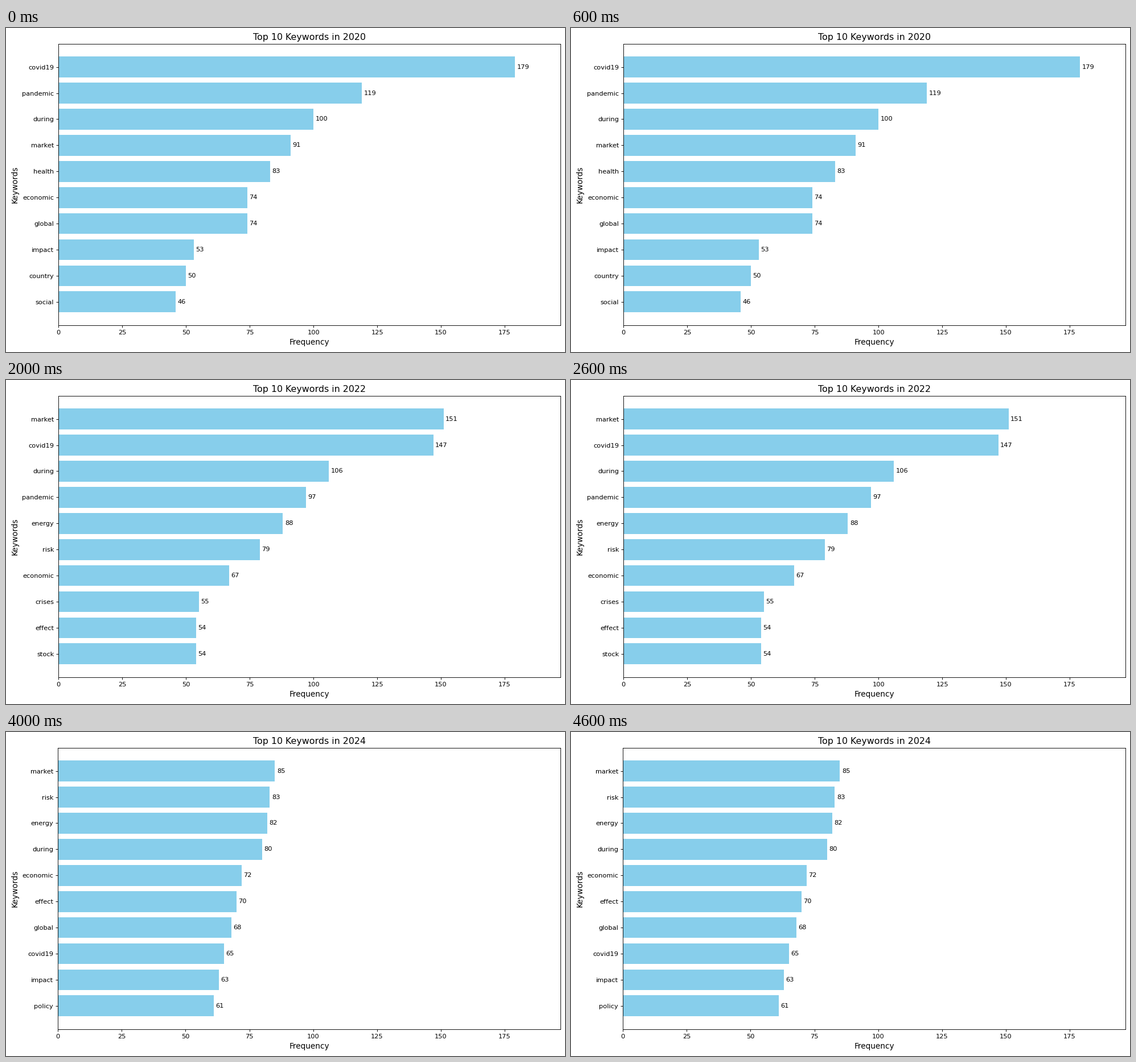
Write a matplotlib script that moves like this. It is 982 px wide and 570 px high and loops after 5 s.

```python
import matplotlib.pyplot as plt
import numpy as np
from matplotlib.animation import FuncAnimation

W, H, DPI = 982, 570, 64
K = 81.8 / DPI  # chart scale relative to the figure dpi

plt.rcParams["font.family"] = "DejaVu Sans"
plt.rcParams["axes.labelsize"] = "large"
plt.rcParams["axes.labelpad"] = 5
scaled = ["font.size", "axes.titlepad", "axes.labelpad", "axes.linewidth"]
scaled += [f"{a}tick.major.{part}" for a in "xy" for part in ("size", "width", "pad")]
for key in scaled:
    plt.rcParams[key] *= K

FIRST_YEAR = 2020
# keywords by rank, and the key points {rank: count} of each ranking curve
RANKINGS = [
    ("covid19 pandemic during market health economic global impact country social",
     {0: 179, 1: 119, 2: 100, 5: 74, 6: 74, 7: 53, 9: 46}),
    ("covid19 pandemic market during impact economic global country stock health",
     {0: 175, 2: 103, 4: 91, 5: 66, 9: 59}),
    ("market covid19 during pandemic energy risk economic crises effect stock",
     {0: 151, 1: 147, 2: 106, 5: 79, 7: 55, 9: 54}),
    ("market covid19 energy risk during stock economic impact green esg",
     {0: 174, 1: 105, 5: 87, 9: 76}),
    ("market risk energy during economic effect global covid19 impact policy",
     {0: 85, 3: 80, 4: 72, 9: 61}),
]
X_MAX = 1.1 * max(points[0] for _, points in RANKINGS)
RIGHT, BOTTOM, TOP = 974.2, 47.3, 542.2  # axes edges, y measured upwards

fig = plt.figure(figsize=(W / DPI, H / DPI), dpi=DPI, facecolor="white")
ax = fig.add_axes([0, 0, 1, 1])


def draw(i):
    text, points = RANKINGS[i]
    words = text.split()
    counts = np.round(np.interp(range(len(words)), list(points), list(points.values())))
    # the longest keyword pushes the axes one pixel to the right
    left = 92.2 if "pandemic" in words else 91.2

    ax.clear()
    ax.set_position([left / W, BOTTOM / H, (RIGHT - left) / W, (TOP - BOTTOM) / H])
    bars = ax.barh(words, counts, color="skyblue")
    ax.bar_label(bars, padding=3 * K)
    ax.set_xlim(0, X_MAX)
    ax.set_xticks(range(0, 176, 25))
    ax.invert_yaxis()
    ax.set_title(f"Top {len(words)} Keywords in {FIRST_YEAR + i}", fontsize=14 * K)
    ax.set_xlabel("Frequency")
    ax.set_ylabel("Keywords")
    return []


anim = FuncAnimation(fig, draw, frames=len(RANKINGS), init_func=lambda: draw(0),
                     interval=1000, repeat=True, repeat_delay=0)
plt.show()
```
